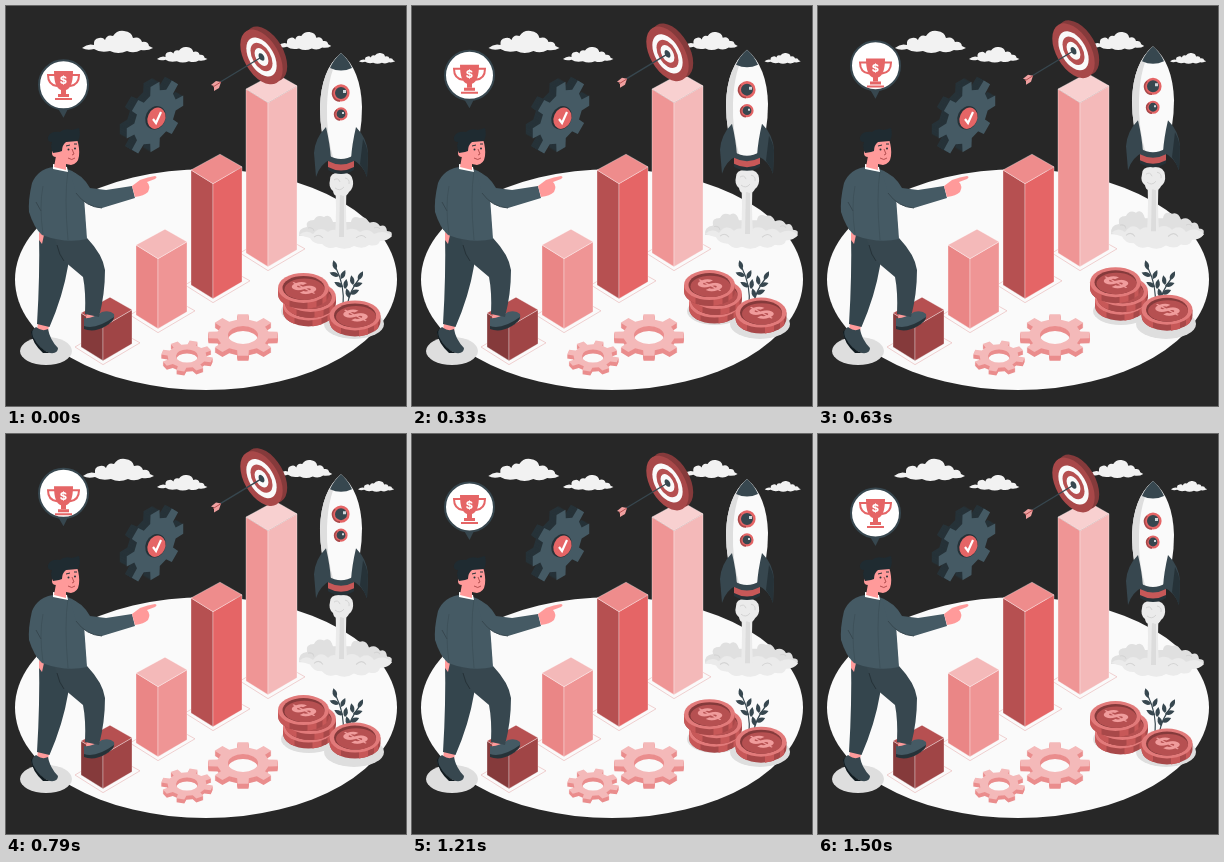
Write an HTML page that moves like this. It is 400 px wide and 400 px high and loops after 1540 ms.

```html
<!DOCTYPE html>
<html>
<head>
<meta charset="utf-8">
<style>
html, body { margin: 0; height: 100%; overflow: hidden; background: #272727; }
svg { display: block; width: 100vw; height: 100vh; }
text { font: 800 13px Inter, sans-serif; text-anchor: middle; }
</style>
</head>
<body>
<svg viewBox="0 0 400 400">
  <defs>
    <path id="cloud" d="M0 17Q6 12 12 14 11 8 17 7 21 6 23 9 25 3 31 5 35-1 42 0 50 1 51 7 58 5 60 11 66 10 67 15L71 17Q66 20 59 19 52 23 45 20 36 24 28 20 18 22 12 18 5 20 0 17Z"/>
    <g id="coin">
      <path d="M-25.5 0V6A25.5 15 0 0 0 25.5 6V0Z" fill="#a84849"/>
      <path d="M-25.5 0V6A25.5 15 0 0 0-14 18.5V10ZM4 14V21L13 19V12ZM19 9V16L23 13V6Z" fill="#c75858"/>
      <ellipse rx="25.5" ry="15" fill="#e27a7a"/>
      <ellipse rx="21" ry="12" fill="#853a3b"/>
      <ellipse cx="1" cy="1.3" rx="20" ry="10.7" fill="#b65051"/>
      <text transform="matrix(.866 -.4 .866 .45 0 0)" y="10" style="font-size:27px" fill="#f09c9c">$</text>
    </g>
    <path id="leaf" d="M0 0Q-4.5-4 0-10Q4.5-4 0 0Z"/>
  </defs>

  <ellipse cx="200" cy="273.6" rx="191" ry="110.4" fill="#fafafa"/>

  <g fill="#f2f2f2">
    <use href="#cloud" class="east" x="76" y="25"/>
    <use href="#cloud" transform="translate(151 41) scale(.71)"/>
    <g class="east"><use href="#cloud" transform="translate(272 26) scale(.75 .82)"/></g>
    <g class="west"><use href="#cloud" transform="translate(353 47) scale(.51 .49)"/></g>
  </g>

  <g id="bars"></g>
  <g id="gears"></g>
  <g transform="rotate(24 150 112)">
    <ellipse cx="149.5" cy="112" rx="10" ry="12" fill="#263238"/>
    <ellipse cx="150.5" cy="112" rx="8.7" ry="11" fill="#e56566"/>
  </g>
  <path d="M147 113l3 4 5-11" fill="none" stroke="#fff" stroke-width="2.2"/>

  <g id="target">
    <g transform="matrix(.866 .5 0 1 260 48)"><circle r="24.5" fill="#853a3b"/></g>
    <g transform="matrix(.866 .5 0 1 255.5 51)">
      <circle r="24.5" fill="#a84849"/>
      <circle r="17.5" fill="#fafafa"/>
      <circle r="12.7" fill="#b65051"/>
      <circle r="8" fill="#fafafa"/>
      <circle r="3.4" fill="#37474f"/>
    </g>
    <path d="M254 52L211 78" stroke="#37474f" stroke-width="1.3"/>
    <path d="M215 76L210 75 205 79 208 80 208 85 213 82Z" fill="#f0a0a0"/>
    <path d="M215 76L207 81" stroke="#b65051"/>
  </g>

  <g id="bubble">
    <path d="M51 101L57.5 112 63 101Z" fill="#37474f"/>
    <circle cx="57.5" cy="79" r="24.5" fill="#fff" stroke="#37474f" stroke-width="2"/>
  </g>
  <g id="trophy" fill="#e56566">
    <path d="M49 69H42Q42 79 51 80M66 69H73Q73 79 64 80" fill="none" stroke="#e56566" stroke-width="2"/>
    <path d="M48 65H67Q67 82 60 84V88H55V84Q48 82 48 65Z"/>
    <path d="M52 88H63V91H52ZM49 92H66V94H49Z"/>
    <text x="57.5" y="78.5" style="font-size:11px" fill="#fff">$</text>
  </g>

  <g id="person">
    <ellipse cx="40" cy="345" rx="26" ry="14" fill="#dedede"/>
    <path d="M32 317L43 319 42 326 31 324ZM81 305L94 307 93 313 80 313Z" fill="#ff9a9a"/>
    <path d="M30 321Q36 326 42 323 44 334 52 342 52 348 44 347 32 343 26 331 24 325 30 321Z" fill="#37474f"/>
    <path d="M28 321Q25 324 27 331 33 343 44 347L37 347Q26 337 25 326Z" fill="#111b20"/>
    <path d="M78 312Q86 313 96 306 104 304 108 308 110 314 100 319 88 327 78 322Z" fill="#455a64"/>
    <path d="M78 320Q90 324 108 311 108 315 100 320 88 327 78 323Z" fill="#263238"/>
    <path d="M33 227L65 234 62 260Q57 290 43.5 321L31 318Q34 270 33 227Z" fill="#34454d"/>
    <path d="M48 232L81 232Q97 249 99 264 99 288 93 311L79 308Q80 286 77 271L58 255Z" fill="#37474f"/>
    <path d="M58 255Q53 249 51 239" fill="none" stroke="#263238"/>
    <path d="M33 226L38 229 36 238 33 234Z" fill="#ff9a9a"/>
    <path d="M47 161L61 163Q72 166 77 177L81 233Q60 238 36 229 28 222 23 206 22 194 26 177 32 163 47 161Z" fill="#455a64"/>
    <path d="M30 196L35 205" fill="none" stroke="#37474f"/>
    <path d="M37 180Q33 200 37 228M62 165Q58 190 62 234" fill="none" stroke="#3c4e57" stroke-width=".7"/>
    <path d="M64 165Q76 168 84 182L100 184 126 180 129 192 96 202Q80 201 70 187Z" fill="#455a64"/>
    <path d="M70 187Q80 201 96 202" fill="none" stroke="#37474f"/>
    <path d="M126 180L134 174Q142 171 149 170 152 171 149 173L141 176Q145 180 142 186 138 190 129 191Z" fill="#ff9a9a"/>
    <path d="M47 158L61 161 62 166 47 163Z" fill="#fff"/>
    <path d="M52 137L71 133Q74 143 73 150 72 158 65 159L60 158 60 164 48 161 50 150Z" fill="#ff9a9a"/>
    <circle cx="50" cy="147" r="4" fill="#ff9a9a"/>
    <path d="M42 131Q44 125 54 126 58 122 66 124L73 122Q75 129 72 135L60 136Q56 139 56 145L53 146 47 147Q44 141 46 136 41 136 42 131Z" fill="#1f2b31"/>
    <path d="M60 140l4-1M68 138l3 0" stroke="#263238"/>
    <circle cx="62.5" cy="143.5" r="1" fill="#263238"/><circle cx="69" cy="142.5" r="1" fill="#263238"/>
    <path d="M66 143l2 5-2 1M62 152q4 3 7 0" fill="none" stroke="#b65051"/>
  </g>

  <g id="smoke" fill="#e0e0e0">
    <path d="M293 230Q292 222 301 221 299 214 308 214 311 208 318 211 324 207 327 216H345Q346 209 354 212 360 210 363 217 370 214 374 220 380 218 381 225 388 225 385 231Z"/>
    <path d="M293 229Q300 223 307 228 314 219 322 226 328 221 336 227 346 219 354 226 362 221 368 228 378 223 386 230 382 235 374 235 372 241 363 239 357 244 348 240 340 245 330 241 322 244 316 238 307 238 304 232 293 233Z" fill="#ebebeb"/>
    <path d="M308 231q5-4 9 1M350 232q6-5 10 0M368 222q4-2 6 1M302 222q5-1 6 3" fill="none" stroke="#d4d4d4"/>
  </g>
  <g id="plume">
    <path d="M329 180H341Q339 200 341 231H329Q331 200 329 180Z" fill="#ebebeb"/>
    <path d="M334 184H338V231H333Z" fill="#dcdcdc"/>
    <path d="M324 174Q324 166 335 167 346 166 347 175 348 182 343 186 340 192 335 189 328 192 327 185 322 181 324 174Z" fill="#ebebeb"/>
    <path d="M328 174q4-3 6 2M339 172q5 1 4 6M329 182q5 4 9-1" fill="none" stroke="#d4d4d4"/>
  </g>

  <g id="rocket">
    <path d="M322 153V164Q335 172 348 164V153Z" fill="#263238"/>
    <path d="M335 47Q315 64 314 101 314 130 323 153 335 160 347 153 356 130 356 101 355 64 335 47Z" fill="#fafafa"/>
    <path d="M335 47Q315 64 314 101 314 130 323 153L328 155Q320 128 321 100 322 66 335 47Z" fill="#dedede"/>
    <path d="M335 47Q328 53 324 62 335 67 346 62 342 53 335 47Z" fill="#37474f"/>
    <path d="M320 121Q309 132 308 147L310 171Q314 158 325 153 324 138 320 121ZM350 121Q361 132 362 147L361 171Q357 158 345 153 346 138 350 121Z" fill="#37474f"/>
    <path d="M357 133Q361 140 362 147L361 171Q358 163 354 158Z" fill="#263238"/>
    <path d="M322 149Q335 157 348 149V156Q335 163 322 156Z" fill="#37474f"/>
    <path d="M322 155Q335 162 348 155V161Q335 168 322 161Z" fill="#c75858"/>
    <g stroke="#e56566" fill="#37474f">
      <circle cx="335" cy="87" r="7.3" stroke-width="2.6"/>
      <circle cx="335" cy="108" r="5.5" stroke-width="2.2"/>
    </g>
    <path d="M329 82A7.5 7.5 0 0 0 334 95M331 104A5.5 5.5 0 0 0 334 114" fill="none" stroke="#a84849" stroke-width="1.6"/>
    <path d="M337 84h3v3h-3zM336 106h2v2h-2z" fill="#cfd8dc"/>
  </g>

  <ellipse cx="303" cy="305" rx="28" ry="14" fill="#dedede"/>
  <ellipse cx="348" cy="318" rx="30" ry="15" fill="#dedede"/>
  <g id="plant" fill="#37474f">
    <path d="M337 300Q339 280 330 262M341 300Q344 284 353 273" fill="none" stroke="#37474f" stroke-width="1.2"/>
  </g>
  <g id="coins">
    <use href="#coin" x="302.5" y="299.5"/>
    <use href="#coin" x="304.5" y="291"/>
    <use href="#coin" x="297.5" y="282"/>
    <use href="#coin" x="349" y="309.5"/>
  </g>
</svg>
<script>
const $ = id => document.getElementById(id);
const poly = (points, fill, extra = '') => `<polygon points="${points}" fill="${fill}" ${extra}/>`;

// Isometric bar: left corner x, top and bottom y of that corner, size of both sides
function bar(x, top, bottom, a, b, [lid, left, right]) {
  const x1 = x + a, x2 = x + a + b, lift = b * .58, down = a * .62;
  const edge = 'stroke="#ffffff77" stroke-width=".7"';
  const foot = [[x - 6, bottom], [x1, bottom + down + 4], [x2 + 8, bottom + down - lift - 1], [x + b, bottom - lift - 4]];
  return poly(foot, 'none', 'stroke="#ecc4c4" stroke-width=".8"') +
    poly([[x, top], [x1, top + down], [x1, bottom + down], [x, bottom]], left, edge) +
    poly([[x1, top + down], [x2, top + down - lift], [x2, bottom + down - lift], [x1, bottom + down]], right, edge) +
    poly([[x, top], [x1, top + down], [x2, top + down - lift], [x + b, top - lift + 1]], lid, edge);
}
$('bars').innerHTML =
  bar(240, 83, 247, 22, 29, ['#f8d0d0', '#ef9595', '#f4b9b9']) +
  bar(185, 164, 279, 22, 29, ['#ee8c8c', '#b65051', '#e56566']) +
  bar(130, 239, 309, 22, 29, ['#f4b9b9', '#ea8686', '#ef9595']) +
  bar(75, 307, 341, 22, 29, ['#b65051', '#853a3b', '#a04546']);

// Flat gear outline with a round hole
function gearPath(teeth, outer, inner, hole, turn) {
  const points = [];
  for (let i = 0; i < teeth; i++)
    for (const [r, s] of [[inner, -.29], [outer, -.2], [outer, .2], [inner, .29]]) {
      const angle = (i + s) / teeth * 2 * Math.PI + turn;
      points.push([r * Math.cos(angle), r * Math.sin(angle)].map(v => v.toFixed(2)));
    }
  return `M${points.join('L')}ZM${hole} 0A${hole} ${hole} 0 1 0 ${-hole} 0A${hole} ${hole} 0 1 0 ${hole} 0Z`;
}
// Stack of outlines that ends in the front face
function gear(x, y, matrix, d, dx, dy, depth, side, face) {
  let out = '';
  for (let i = depth; i >= 0; i--)
    out += `<path transform="matrix(${matrix} ${x + dx * i} ${y + dy * i})" d="${d}" fill="${i ? side : face}" fill-rule="evenodd"/>`;
  return out;
}
$('gears').innerHTML =
  gear(149, 111, '.866 -.5 0 1', gearPath(8, 33, 24.5, 9, 0), -1, -.55, 7, '#263238', '#455a64') +
  gear(237, 329, '1 0 0 .6', gearPath(8, 35, 26, 15, 0), 0, 1, 5, '#ea8d8d', '#f4b9b9') +
  gear(181, 350, '1 0 0 .6', gearPath(8, 26, 19.5, 11, .26), 0, 1, 4, '#ea8d8d', '#f4b9b9');

const leaves = [[330, 264, -15], [333, 270, -70], [335, 273, 25], [337, 281, -60], [339, 283, 8],
  [352, 274, 30], [347, 279, -10], [347, 280, 72], [344, 288, 66], [343, 292, -15]];
$('plant').innerHTML += leaves.map(([x, y, a]) =>
  `<use href="#leaf" transform="translate(${x} ${y}) rotate(${a})"/>`).join('');

const move = (id, y, k) => $(id).setAttribute('transform', `translate(0 ${-y * k})`);
function draw(now) {
  const k = (1 - Math.cos((now + 45) / 1540 * 2 * Math.PI)) / 2;
  move('bubble', 20, k);
  move('trophy', 13, k);
  move('target', 6.5, k);
  move('rocket', 7, k);
  move('plume', 6, k);
  move('coins', 6, k);
  $('smoke').setAttribute('transform', `translate(0 243) scale(1 ${1 + .14 * k}) translate(0 -243)`);
  document.querySelectorAll('.east').forEach(c => c.setAttribute('transform', `translate(${k})`));
  document.querySelectorAll('.west').forEach(c => c.setAttribute('transform', `translate(${-k})`));
  requestAnimationFrame(draw);
}
draw(performance.now());
</script>
</body>
</html>
```
